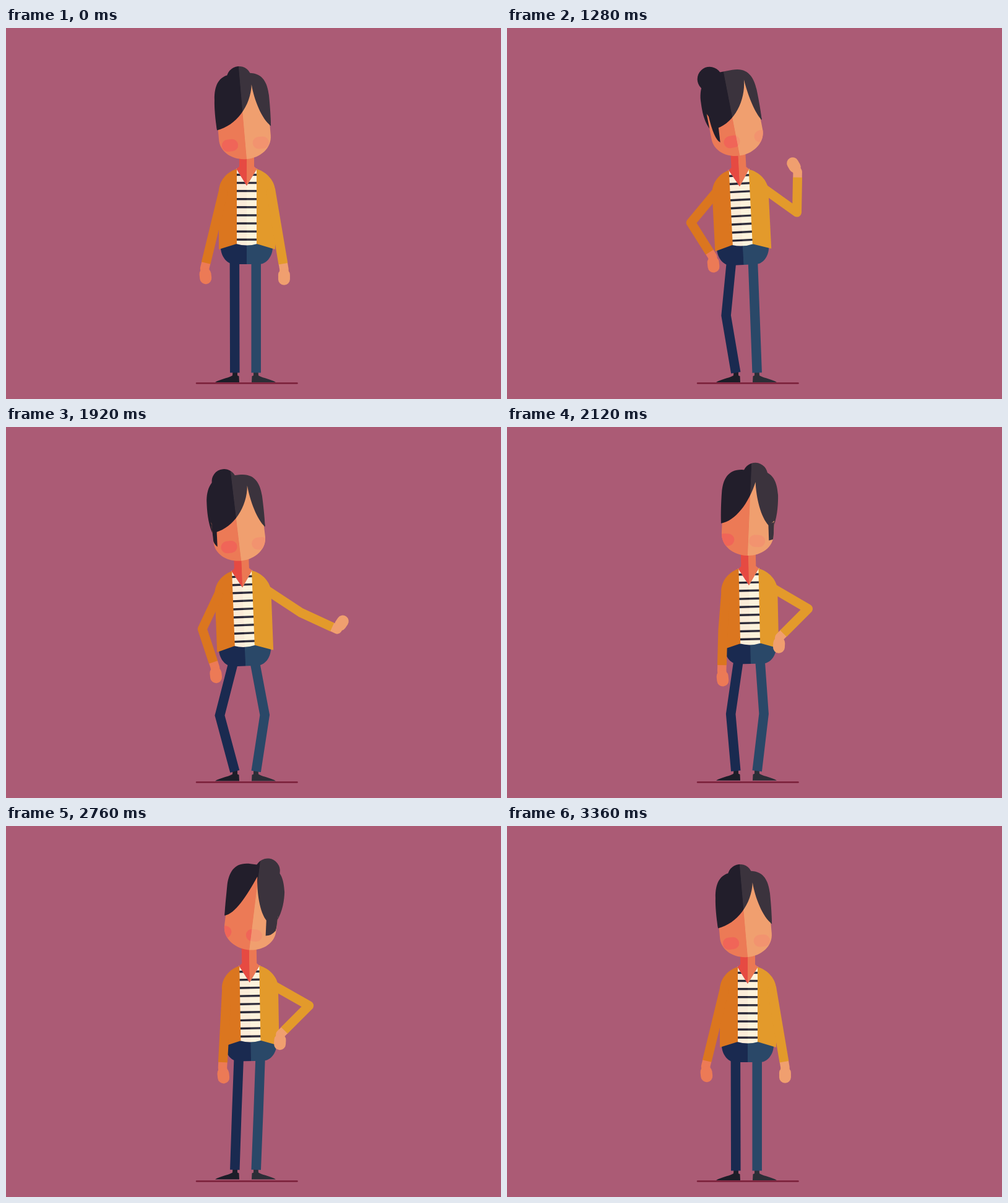
Recreate the animation shown at these times as an HTML page with a canvas. Size 800 px wide and 600 px high, loop 3.44 s.

```html
<!DOCTYPE html>
<html lang="en">
<head>
<meta charset="utf-8">
<title>Waving woman</title>
<style>
  html, body { margin: 0; width: 100%; height: 100%; overflow: hidden; background: #ab5b75; }
  canvas { display: block; }
</style>
</head>
<body>
<canvas id="stage" width="800" height="600"></canvas>
<script>
const ctx = document.getElementById('stage').getContext('2d');
const LOOP = 3440, STEP = 40, MOVE = 560, RAD = Math.PI / 180;
const C = {
  bg: '#ab5b75', ground: '#7a1f39',
  skin: ['#ec7a56', '#f09f6f'], neck: ['#e64a42', '#eb7853'], cheek: ['#f06558', '#f2936f'],
  hair: ['#221e2b', '#3b333d'], coat: ['#db761f', '#e39a2b'], shirt: ['#fbecd8', '#fdf3dc'],
  stripe: ['#282635', '#33313f'], jeans: ['#1a2a50', '#2a4868'], shoe: ['#1c1d28', '#2c2e37']
};

// Three key poses: hips and knees, chin and head, arm angles in degrees.
const rest = {
  x: 389, y: 382, lean: 0, knee: 0, lift: 0,
  chinX: 389, chinY: 212, tilt: -5, turn: 0,
  armL: 103.6, foreL: 103.6, armR: 80.4, foreR: 80.4, handR: 90
};
const wave = {
  x: 382.5, y: 383, lean: -2.9, knee: -12, lift: 0,
  chinX: 378.5, chinY: 206, tilt: -11, turn: 14.5,
  armL: 129.7, foreL: 57.7, armR: 35.5, foreR: -89, handR: -120
};
const akimbo = {
  x: 396, y: 380, lean: -1, knee: 0, lift: -1.5,
  chinX: 390.5, chinY: 200, tilt: 7, turn: -17.5,
  armL: 93, foreL: 93, armR: 29.4, foreR: 135, handR: 93
};

// fore: when the right forearm sets off within the move; swing: extra raise of that arm.
const moves = [
  { at: 480, from: rest, to: wave, fore: 0.35, swing: 35 },
  { at: 1700, from: wave, to: akimbo, fore: 0.13, swing: 0 },
  { at: 2740, from: akimbo, to: rest, fore: 0.13, swing: 0 }
];

const clamp = (v, a, b) => Math.min(b, Math.max(a, v));
const ramp = (t, a, b) => { const k = clamp((t - a) / (b - a), 0, 1); return k * k * (3 - 2 * k); };

function poseAt(t) {
  const { at, from, to, fore, swing } = moves.findLast(m => t >= m.at) || moves[0];
  const p = (t - at) / MOVE, pose = {};
  const ease = (start, end, ...keys) => {
    const k = ramp(p, start, end);
    for (const key of keys) pose[key] = from[key] + (to[key] - from[key]) * k;
  };
  ease(0, 1, 'x', 'y', 'lean', 'knee', 'lift', 'armR');
  ease(0.08, 1.08, 'chinX', 'chinY', 'tilt', 'turn');
  ease(0.05, 0.85, 'armL', 'foreL');
  ease(fore, fore + 0.52, 'foreR');
  ease(fore + 0.07, fore + 0.6, 'handR');

  // every move dips through bent knees
  const dip = Math.sin(Math.PI * clamp(p, 0, 1)) ** 2;
  pose.y += 5 * dip;
  pose.chinY += 13 * dip;
  pose.armR -= swing * dip;
  pose.kneeL = pose.knee - 17 * dip;
  pose.kneeR = 17 * dip;

  const sway = (1 - Math.cos((t - 1280) / 386 * 2 * Math.PI)) / 2
    * ramp(t, 960, 1100) * (1 - ramp(t, 1700, 1820));
  pose.foreR += 9 * sway;
  pose.handR += 60 * sway;
  return pose;
}

// Hard two-tone fill split at x.
function tone([a, b], x = 0) {
  const g = ctx.createLinearGradient(x - 0.4, 0, x + 0.4, 0);
  g.addColorStop(0, a);
  g.addColorStop(1, b);
  return g;
}

function shape(d, fill) {
  ctx.fillStyle = fill;
  ctx.fill(new Path2D(d));
}

function line(points, width, color, cap = 'butt', join = 'miter') {
  ctx.beginPath();
  points.forEach(p => ctx.lineTo(p[0], p[1]));
  Object.assign(ctx, { lineWidth: width, strokeStyle: color, lineCap: cap, lineJoin: join });
  ctx.stroke();
}

function local(x, y, deg, draw) {
  ctx.save();
  ctx.translate(x, y);
  ctx.rotate(deg * RAD);
  draw();
  ctx.restore();
}

const polar = ([x, y], deg, len) => [x + Math.cos(deg * RAD) * len, y + Math.sin(deg * RAD) * len];

// Point given relative to the hips, in stage coordinates.
function place(pose, x, y) {
  const c = Math.cos(pose.lean * RAD), s = Math.sin(pose.lean * RAD);
  return [pose.x + x * c - y * s, pose.y + x * s + y * c];
}

function feet() {
  shape('M366.5 554H374V562L376.5 563L377 573H338C345 568 357 567 366 562Z', C.shoe[0]);
  shape('M407.5 554H400V562L397.5 563L397 573H436C429 568 417 567 408 562Z', C.shoe[1]);
}

function leg(pose, hipX, footX, bend, color) {
  const hip = place(pose, hipX, -6), foot = [footX, 557.5 + pose.lift], k = 0.485;
  const knee = [hip[0] + (foot[0] - hip[0]) * k + bend, hip[1] + (foot[1] - hip[1]) * k];
  line([hip, knee, foot], 15.5, color);
}

function torso() {
  shape('M-42 -40V-26C-41 -11 -31 0 -20 0H20C31 0 41 -11 42 -26V-40Z', tone(C.jeans));
  const shirt = 'M-17 -155L0 -127L17 -155V-33Q0 -28 -17 -33Z';
  shape(shirt, tone(C.shirt));
  ctx.save();
  ctx.clip(new Path2D(shirt));
  ctx.fillStyle = tone(C.stripe);
  for (let i = 0; i < 9; i++) ctx.fillRect(-17, -146.3 + i * 13.1, 34, 3.4);
  ctx.restore();
  shape('M-12 -200V-158L-16.5 -154L0 -127L16.5 -154L12 -158V-200Z', tone(C.neck));
  shape('M-16 -154C-33 -149 -45 -134 -45 -118V-24L-16 -33Z', C.coat[0]);
  shape('M16 -154C33 -149 46 -134 46 -118V-24L16 -33Z', C.coat[1]);
}

function arm(shoulder, upper, fore, hand, side) {
  const elbow = polar(shoulder, upper, 66), cuff = polar(elbow, fore, 56.5);
  const wrist = polar(cuff, fore, 9), skin = C.skin[side];
  line([polar(cuff, fore, -1), wrist, polar(wrist, hand, 8)], 14.5, skin, 'butt', 'round');
  line([polar(wrist, hand, 9), polar(wrist, hand, 16)], 19, skin, 'round');
  line([shoulder, elbow, cuff], 15, C.coat[side], 'butt', 'round');
}

function head(turn) {
  const toRight = turn > 0, split = -0.16 * turn, hair = tone(C.hair, split);
  const bl = clamp(turn / 15, 0, 1), br = clamp(-turn / 17, 0, 1);
  const part = 18.3 + turn * (toRight ? 0.65 : 0.97);
  const xl = Math.max(-43.7, turn - 43.7), xr = Math.min(43.7, 43.7 + 1.06 * turn);
  const wl = part - xl, wr = xr - part;

  // bun and back hair
  ctx.fillStyle = hair;
  ctx.beginPath();
  ctx.arc(-1 - turn * (toRight ? 1.75 : 1), -130.7, 20, 0, 7);
  ctx.fill();
  shape(`M${-43.7 + 2.5 * bl} -51C${-45 - 5 * bl} -68 ${-45 - 3 * bl} -88 ${-43.5 - 4 * bl - 2 * br} -100
    C${-42 - 3 * bl - 3 * br} -122 ${-34 - 4 * br} -138.5 -12 -138.5H12
    C38 -138.5 44 -120 ${44.8 + 3 * br} -100C${45 + 4 * br} -88 ${45 + 4 * br} -68 ${43.7 - 3 * br} -51Z`, hair);

  const face = new Path2D('M-42 -85L-25 -125H30L42 -85V-35C42 -14 22 0 0 0C-22 0 -42 -14 -42 -35Z');
  ctx.fillStyle = tone(C.skin, split);
  ctx.fill(face);

  // cheeks and side locks stay inside the face
  ctx.save();
  ctx.clip(face);
  ctx.fillStyle = tone(C.cheek, split);
  for (const x of [-25, 25]) {
    ctx.beginPath();
    ctx.roundRect(x + turn - 13.2, -34.2, 26.4, 19.6, 9.8);
    ctx.fill();
  }
  if (toRight) shape(`M${xl + 2} -54L${xl} -27Q${xl - 9} -34 ${xl - 10.5} -73Z`, hair);
  else if (turn) shape(`M${xr - 1} -52L${xr + 1} -26Q${xr + 10} -27 ${xr + 16} -36L${xr + 20} -62Z`, hair);
  ctx.restore();

  // fringe
  shape(`M${part} -119.5C${part - 4 - 10 * br} -85 ${xl + wl / 2 - 6 * br} -55 ${xl} -50.5
    L${Math.max(-43.7, xl - 10.5)} -72L-44 -80L-43 -100L-30 -128L0 -137L30 -130L43 -100L44 -80
    L${Math.min(43.7, xr + 18)} -60L${xr} -50
    C${part + 0.45 * wr} -62 ${part + 0.07 * wr} -95 ${part} -119.5Z`, hair);
}

function draw(t) {
  const pose = poseAt(t);
  ctx.fillStyle = C.bg;
  ctx.fillRect(0, 0, 800, 600);
  line([[308, 574.6], [470.5, 574.6]], 2.5, C.ground, 'round');
  local(0, pose.lift, 0, feet);
  leg(pose, -19.6, 369.8, pose.kneeL, C.jeans[0]);
  leg(pose, 15.2, 404.2, pose.kneeR, C.jeans[1]);
  local(pose.x, pose.y, pose.lean, torso);
  arm(place(pose, -37, -121), pose.armL, pose.foreL, 84, 0);
  arm(place(pose, 38.5, -121.5), pose.armR, pose.foreR, pose.handR, 1);
  local(pose.chinX, pose.chinY, pose.tilt, () => head(pose.turn));
}

function tick() {
  const t = performance.now() % LOOP;
  draw(Math.floor(t / STEP) * STEP);
  requestAnimationFrame(tick);
}
tick();
</script>
</body>
</html>
```
